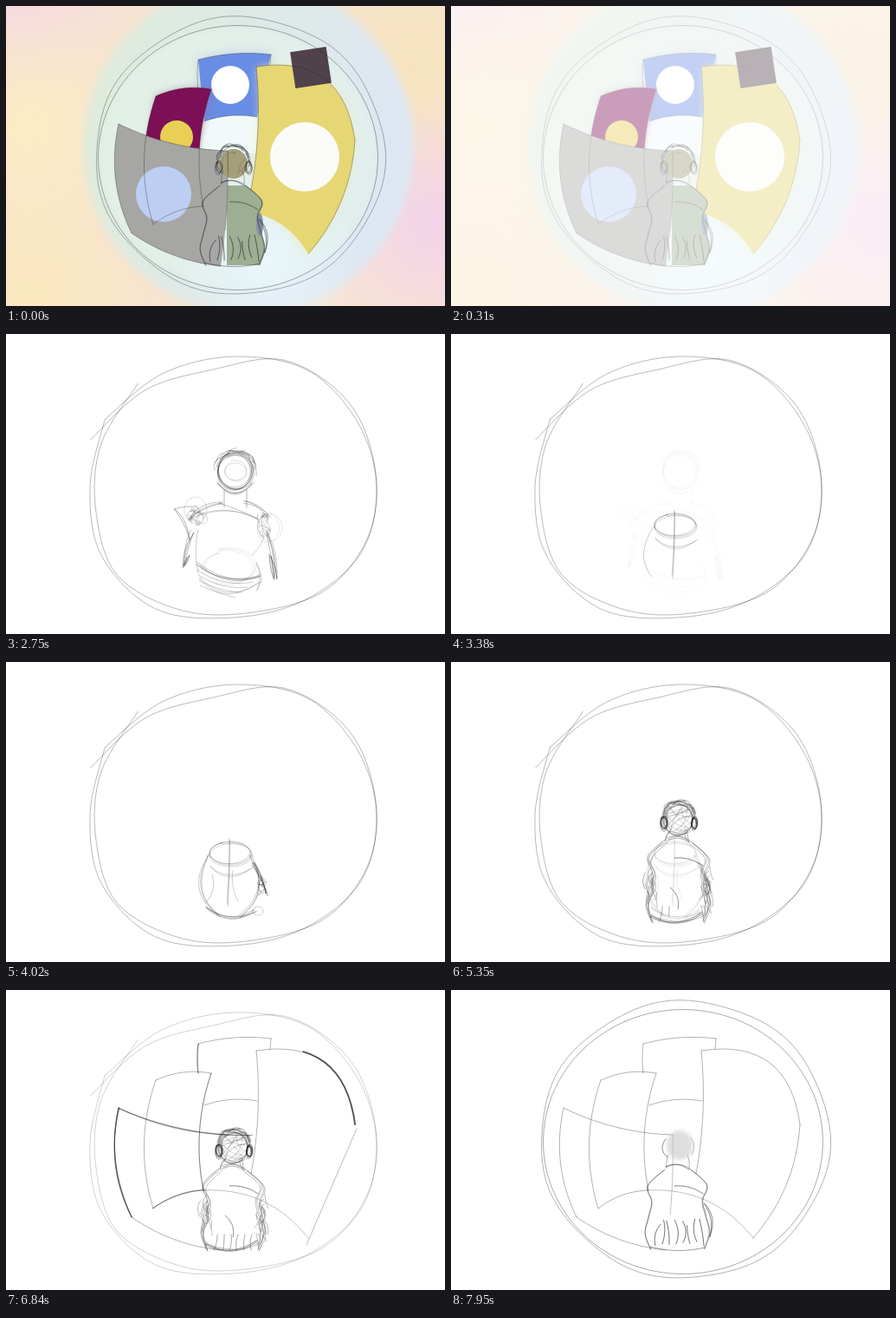
Recreate the animation shown at these times as an HTML page with a canvas. Size 507x346 px, loop 8 s.

```html
<!DOCTYPE html>
<html lang="en">
<head>
<meta charset="utf-8">
<title>Sketch time-lapse</title>
<style>
  html, body { margin: 0; width: 100%; height: 100%; overflow: hidden; background: #fff; }
  canvas { display: block; width: 507px; height: 346px; }
</style>
</head>
<body>
<canvas id="stage" width="507" height="346"></canvas>
<script>
const ctx = document.getElementById('stage').getContext('2d');
const W = 507, H = 346, LOOP = 8000, TAU = 2 * Math.PI;
const clamp = v => Math.max(0, Math.min(1, v));
const mix = (a, b, u) => a + (b - a) * u;
const range = n => Array.from({ length: n }, (_, i) => i);
const sides = [-1, 1];

let seed = 11;
const rnd = () => (seed = (seed * 16807) % 2147483647) / 2147483647;
const spread = r => (rnd() * 2 - 1) * r;

// --- Curves, as lists of points ---

// Catmull-Rom curve through the points.
function smooth(pts) {
  const out = [pts[0]];
  const at = i => pts[Math.max(0, Math.min(pts.length - 1, i))];
  for (let i = 0; i < pts.length - 1; i++) {
    const [a, b, c, d] = [at(i - 1), at(i), at(i + 1), at(i + 2)];
    for (let k = 1; k <= 8; k++) {
      const u = k / 8;
      out.push([0, 1].map(n => 0.5 * (2 * b[n] + (c[n] - a[n]) * u
        + (2 * a[n] - 5 * b[n] + 4 * c[n] - d[n]) * u * u
        + (3 * b[n] - a[n] - 3 * c[n] + d[n]) * u ** 3)));
    }
  }
  return out;
}

// Bowed edge; a positive bulge leans to the left of the direction of travel.
function bow([x0, y0], [x1, y1], bulge = 0) {
  const len = Math.hypot(x1 - x0, y1 - y0) || 1;
  return range(17).map(i => {
    const u = i / 16, push = 4 * u * (1 - u) * bulge / len;
    return [mix(x0, x1, u) + (y1 - y0) * push, mix(y0, y1, u) - (x1 - x0) * push];
  });
}

const oval = (cx, cy, rx, ry, radius = () => 1) => range(97).map(i => {
  const a = i / 96 * TAU - 2, r = radius(a);
  return [cx + rx * r * Math.cos(a), cy + ry * r * Math.sin(a)];
});

// Freehand loop from one radius every 30 degrees.
const loop = (from, radii) => smooth(radii.map((r, i) => {
  const a = (from + 30 * i) * Math.PI / 180;
  return [262.5 + 165.5 * r * Math.cos(a), 176.5 + 150.5 * r * Math.sin(a)];
}));

// One side of a body: half-widths spaced evenly from top to bottom.
const flank = (side, cx, top, bottom, widths) => smooth(widths.map((w, i) =>
  [cx + side * w, mix(top, bottom, i / (widths.length - 1))]));

// --- Pencil strokes ---

// A curve, loosely retraced a number of times.
function pencil(pts, alpha = 0.5, width = 0.7, times = 1, wobble = 2) {
  const runs = range(times).map(() => {
    const w = times > 1 ? wobble : 0;
    const [ax, ay, bx, by, mx, my] = range(6).map(() => spread(w));
    return pts.map(([x, y], i) => {
      const u = i / (pts.length - 1), hump = 4 * u * (1 - u);
      return [x + mix(ax, bx, u) + mx * hump, y + mix(ay, by, u) + my * hump];
    });
  });
  return { runs, alpha, width };
}

// Many short strokes; the rule gives start, end and bulge for each u in 0..1.
const strands = (n, alpha, width, rule) =>
  range(n).map(i => pencil(bow(...rule(i / (n - 1))), alpha, width));

// Random strokes along the flanks of a body.
const scuffs = (n, alpha, reach, top, bottom) => strands(n, alpha, 0.7, () => {
  const x = 262 + (rnd() < 0.5 ? -1 : 1) * (reach + spread(6)), y = mix(top, bottom, rnd());
  return [[x, y], [x + spread(6), y + 8 + rnd() * 12], spread(4)];
});

// Random chords across an ellipse.
const chords = (n, cx, cy, rx, ry, alpha) => strands(n, alpha, 0.6, () => {
  const [a, b] = [rnd() * TAU, rnd() * TAU];
  const rim = t => [cx + rx * Math.cos(t), cy + ry * Math.sin(t)];
  return [rim(a), rim(b), spread(6)];
});

// Locks of hair swept over the crown.
const crown = (n, cx, cy, r, alpha) => strands(n, alpha, 0.7, u => {
  const a = Math.PI * (1.02 + 0.8 * u);
  const rim = (t, k) => [cx + r * k * Math.cos(t), cy + r * k * Math.sin(t)];
  return [rim(a, 1 + spread(0.1)), rim(a + 0.5 + rnd() * 0.5, 1.03 + spread(0.12)), 2 + spread(2)];
});

// --- The drawing, stage by stage ---

const roughRing = [
  pencil(loop(200, [1.06, 0.965, 0.91, 1.035, 1.035, 1, 1.015, 1.02, 0.97, 1.01, 1.055, 0.975, 0.98, 1.035]), 0.45),
  pencil(loop(210, [1.035, 1, 1, 1.035, 1, 1, 1.025, 1, 1, 1.08, 1.06, 1, 1.035]), 0.45)
];

const firstBody = [
  pencil(bow([213, 214], [291, 213], 9), 0.3, 0.7, 2),
  pencil(bow([246, 195], [290, 213], 1), 0.4),
  ...sides.map(s => pencil(oval(260 + 35 * s, 213, 5, 6), 0.3, 0.6, 2)),
  ...sides.map(s => pencil(bow([258 + 43 * s, 228], [258 + 53 * s, 275 + 7 * s], 2 * s), 0.4, 0.7, 4)),
  ...sides.map(s => pencil(bow([258 + 48 * s, 256], [258 + 53 * s, 275 + 7 * s]), 0.55, 0.9, 3)),
  pencil(oval(304, 224, 13, 16), 0.16, 0.6, 2),
  pencil(bow([298, 233], [284, 255], 2), 0.3),
  pencil(oval(258, 268, 30, 19), 0.13, 0.6, 3, 3),
  ...strands(5, 0.33, 0.7, u => [[220 + 4 * u, 266 + 24 * u], [293 - 28 * u, 280 + 24 * u], -9 + 8 * u]),
  pencil(bow([290, 265], [288, 296], 5), 0.3, 0.7, 2)
];

const firstSeat = [
  pencil(bow([222, 226], [222, 276], -3), 0.35),
  pencil(bow([222, 265], [293, 278], -10), 0.4, 0.7, 3),
  pencil(bow([222, 280], [294, 284], -17), 0.3, 0.7, 2)
];

const firstHead = [
  pencil(oval(265, 159, 20, 21), 0.4, 0.7, 6, 3),
  pencil(oval(265, 157, 12, 10), 0.25, 0.6, 2),
  ...crown(18, 265, 158, 23, 0.4),
  pencil(bow([245, 171], [285, 171], -13), 0.4, 0.7, 3),
  ...sides.map(s => pencil(bow([265 + 13 * s, 180], [265 + 13 * s, 200]), 0.5)),
  ...sides.map(s => pencil(bow([262 + 12 * s, 194], [258 + 46 * s, 212], 4 * s), 0.4, 0.7, 3)),
  pencil(bow([215, 199], [195, 202], -1), 0.45),
  pencil(bow([195, 202], [211, 236], 2), 0.5, 0.7, 2),
  pencil(oval(219, 203, 13, 15), 0.2),
  ...chords(14, 219, 211, 8, 9, 0.4),
  ...chords(14, 299, 222, 7, 14, 0.35),
  pencil(bow([218, 216], [237, 248], 2), 0.4, 0.7, 2)
];

const potSides = sides.map(s => pencil(flank(s, 258, 222, 294, [24, 32, 34, 28, 12]), 0.35, 0.7, 3));
const bowl = [
  pencil(oval(259, 222, 24, 13), 0.3, 0.6, 4),
  pencil(bow([237, 236], [284, 237], -10), 0.25, 0.6, 3),
  pencil(bow([259, 203], [255, 280], 2), 0.35, 0.7, 2),
  ...potSides,
  pencil(bow([238, 245], [230, 278], 5), 0.35),
  pencil(bow([262, 240], [268, 276], -3), 0.3),
  pencil(bow([232, 283], [288, 287], -10), 0.4, 0.7, 4),
  pencil(bow([286, 233], [301, 268], 2), 0.5, 0.9, 4),
  ...chords(10, 297, 259, 5, 8, 0.45),
  pencil(oval(291, 287, 6, 5), 0.3)
];

const torso = [15, 34, 29, 33, 37, 31];
const torsoSides = sides.map(s => flank(s, 262, 207, 299, torso));
const headphones = (alpha, width, times) =>
  sides.map(s => pencil(oval(263 + 18 * s, 186, 3.5, 7), alpha, width, times, 1.5));

const roughFigure = [
  pencil(oval(263, 181, 17, 17), 0.4, 0.7, 5),
  ...chords(24, 263, 180, 16, 15, 0.3),
  ...crown(24, 263, 180, 19, 0.5),
  ...headphones(0.6, 0.9, 5),
  pencil(bow([249, 205], [275, 207], 4), 0.5, 0.7, 3),
  ...sides.map(s => pencil(bow([262 + 10 * s, 194], [262 + 13 * s, 207]), 0.5, 0.7, 2)),
  ...torsoSides.map(pts => pencil(pts, 0.4, 0.7, 4, 2.5)),
  pencil(bow([258, 226], [291, 235], 3), 0.6, 0.9),
  ...scuffs(34, 0.45, 32, 234, 282),
  pencil(bow([232, 291], [292, 291], -9), 0.4, 0.7, 5, 3),
  pencil(bow([253, 260], [262, 285], 4), 0.55, 0.9),
  ...strands(6, 0.5, 0.8, u => [[244 + 40 * u, 282], [242 + 44 * u + spread(3), 300], spread(2)])
];

// Corners run clockwise from the top left.
const back = [[222, 62], [306, 56], [290, 128], [229, 133]];
const tall = [[173, 104], [237, 96], [228, 231], [170, 252]];
const near = [[130, 136], [256, 167], [248, 300], [145, 262]];
const wide = [[289, 70], [403, 155], [349, 286], [283, 212]];

// Edges of a quad from one bulge per side.
const quad = (c, bulges) => bulges.map((b, i) => bow(c[i], c[(i + 1) % 4], b));
const backEdges = quad(back, [4, 0, -4, 0]);
const tallEdges = quad(tall, [5, -9, -5, 12]);
const nearEdges = quad(near, [-7, 3, 7, 11]);
const wideEdges = quad(wide, [36, 12, 0, -5]);
const backLeft = bow(back[0], [222, 96], -1);
const floor = bow(tall[2], wide[2], 17);

const frames = [
  backLeft, backEdges[0], bow(back[1], [305, 68]), backEdges[2], ...tallEdges,
  nearEdges[0], nearEdges[2], nearEdges[3], wideEdges[3]
].map(e => pencil(e, 0.5));
const floorLine = pencil(floor, 0.4);
const wideCurve = [wideEdges[0], wideEdges[1]].map(e => pencil(e, 0.5));

const boldFrames = [
  pencil(backLeft, 0.5, 1),
  pencil(tallEdges[1], 0.4, 0.8),
  pencil(tallEdges[2], 0.35, 0.9, 2, 1),
  pencil(bow(near[0], [284, 168], -9), 0.45, 0.8, 2, 1),
  pencil(nearEdges[3], 0.5, 0.9, 3, 1),
  pencil(wideEdges[0], 0.5),
  pencil(wideEdges[0].slice(5), 0.5, 1.1, 3, 1),
  pencil(bow([405, 160], [347, 294]), 0.45)
];

const outerRing = [pencil(oval(270.5, 172.5, 167, 160, a => 1 + 0.008 * Math.sin(7 * a + 1)), 0.5)];
const innerRing = [pencil(oval(268, 175, 161.5, 152.5), 0.55)];

const cleanFigure = [
  pencil(bow([248, 204], [275, 207], 4), 0.55, 0.8, 2, 1),
  ...sides.map(s => pencil(bow([262 + 11 * s, 190], [262 + 13 * s, 206], s), 0.5)),
  ...torsoSides.map(pts => pencil(pts, 0.5, 0.8, 2, 1)),
  pencil(bow([230, 296], [293, 297], -4), 0.55, 0.8),
  pencil(bow([258, 226], [291, 235], 3), 0.6, 0.9),
  pencil(nearEdges[1].slice(0, 12), 0.4),
  ...strands(8, 0.65, 1, u => [[239 + 48 * u + spread(4), 260 + rnd() * 12], [236 + 56 * u, 293 + spread(3)], spread(4)]),
  pencil(bow([293, 247], [298, 284], 5), 0.6, 0.9, 2, 1),
  pencil(bow([248, 172], [250, 193], -5), 0.6, 0.9),
  pencil(bow([277, 170], [278, 190], 3), 0.45)
];
const paintedHair = [...crown(20, 263, 179, 18, 0.6), ...headphones(0.55, 0.9, 3), ...chords(5, 263, 181, 14, 12, 0.3)];

// Each group is drawn from..to, then rubbed out over gone..clear.
const groups = [
  { items: roughRing, from: 630, to: 920, gone: 6600, clear: 7200 },
  { items: firstBody, from: 900, to: 1330, gone: 2990, clear: 3380 },
  { items: firstSeat, from: 1340, to: 2040, gone: 2990, clear: 3380 },
  { items: firstHead, from: 2120, to: 2740, gone: 2990, clear: 3380 },
  { items: bowl, from: 3220, to: 4010, gone: 4720, clear: 5700 },
  { items: roughFigure, from: 4090, to: 5350, gone: 7320, clear: 7640 },
  { items: [...frames, floorLine], from: 5590, to: 6370 },
  { items: boldFrames, from: 5900, to: 6800, gone: 7240, clear: 7640 },
  { items: outerRing, from: 6920, to: 7240 },
  { items: innerRing, from: 7320, to: 7640 },
  { items: wideCurve, from: 7320, to: 7640 },
  { items: cleanFigure, from: 7400, to: 7880 }
];

function drawStroke({ runs, alpha, width }, part = 1, fade = 1) {
  ctx.strokeStyle = `rgba(35,35,38,${alpha * fade})`;
  ctx.lineWidth = width;
  runs.forEach((pts, i) => {
    const n = Math.ceil(clamp(part * runs.length - i) * pts.length);
    if (n < 2) return;
    ctx.beginPath();
    pts.slice(0, n).forEach(p => ctx.lineTo(...p));
    ctx.stroke();
  });
}

function drawSketch(t) {
  for (const { items, from, to, gone = Infinity, clear = Infinity } of groups) {
    if (t <= from || t >= clear) continue;
    const fade = t > gone ? 1 - (t - gone) / (clear - gone) : 1;
    const done = clamp((t - from) / (to - from)) * items.length;
    items.forEach((item, i) => drawStroke(item, clamp(done - i), fade));
  }
  const head = clamp((t - 7400) / 300);
  if (head) spot(264, 179, 15, 17, `rgba(195,195,195,${0.55 * head})`, 2);
}

// --- The finished painting ---

function spot(x, y, rx, ry, color, blur = 0) {
  ctx.filter = blur ? `blur(${blur}px)` : 'none';
  ctx.fillStyle = color;
  ctx.beginPath();
  ctx.ellipse(x, y, rx, ry, 0, 0, TAU);
  ctx.fill();
  ctx.filter = 'none';
}

function fill(color, edges, blur = 0) {
  ctx.filter = blur ? `blur(${blur}px)` : 'none';
  ctx.fillStyle = color;
  ctx.beginPath();
  edges.flat().forEach(p => ctx.lineTo(...p));
  ctx.fill();
  ctx.filter = 'none';
}

function glow(x, y, r, rgb) {
  const g = ctx.createRadialGradient(x, y, 0, x, y, r);
  g.addColorStop(0, `rgba(${rgb},1)`);
  g.addColorStop(1, `rgba(${rgb},0)`);
  ctx.fillStyle = g;
  ctx.fillRect(0, 0, W, H);
}

function drawPainting() {
  ctx.fillStyle = '#f8e4d2';
  ctx.fillRect(0, 0, W, H);
  glow(10, 0, 130, '245,217,226');
  glow(30, 140, 150, '251,236,196');
  glow(30, 330, 160, '251,233,190');
  glow(470, 70, 170, '246,227,190');
  glow(495, 250, 150, '243,211,234');
  const mist = ctx.createLinearGradient(90, 0, 470, 100);
  mist.addColorStop(0, '#dfebda');
  mist.addColorStop(1, '#dde7f3');
  spot(280, 163, 191, 192, mist, 5);
  spot(268, 175, 160, 151, 'rgba(228,243,236,.6)', 3);
  glow(300, 290, 110, '233,246,252');

  fill('rgba(170,180,225,.6)', backEdges, 6);
  fill('#688de4', backEdges);
  fill('#f1f9f9', [backEdges[2], [[226, 170], [289, 170]]]);
  spot(259, 91, 22, 22, '#fff');

  fill('rgba(165,95,140,.5)', tallEdges.slice(0, 1).concat([[[221, 166], [163, 166]]]), 4);
  const nearSide = [[221, 170], [162, 170]];
  fill('#7d0f56', [tallEdges[0], tallEdges[1].slice(0, 9), nearSide, tallEdges[3].slice(8)]);
  spot(197, 151, 19, 19, '#e8cf55');

  fill('#a6a6a4', nearEdges);
  spot(182, 217, 32, 32, '#bccff2');

  fill('rgba(240,233,175,.6)', wideEdges, 5);
  fill('#e6d774', [wideEdges[0], wideEdges[1], bow(wide[2], [284, 238], -9), wideEdges[3]]);
  spot(345, 174, 40, 40, '#fbfbf9');

  ctx.save();
  ctx.translate(352, 71);
  ctx.rotate(-0.15);
  ctx.fillStyle = '#50424a';
  ctx.fillRect(-21, -21, 42, 42);
  ctx.restore();

  ctx.save();
  ctx.beginPath();
  ctx.rect(255, 190, 60, 120);
  ctx.clip();
  fill('#9dae92', [torsoSides[0], [...torsoSides[1]].reverse()]);
  ctx.restore();
  spot(263, 182, 16, 17, '#a39f78');
  spot(293, 252, 4, 13, '#8790a4');

  [frames, wideCurve, outerRing, innerRing, cleanFigure, paintedHair].flat().forEach(s => drawStroke(s));
}

// --- Playback ---

// Bursts of change: start, end, number of steps.
const bursts = [
  [110, 390, 5], [630, 1100, 7], [1260, 2040, 11], [2120, 2910, 11], [2990, 3780, 11],
  [3860, 4650, 11], [4720, 5510, 11], [5590, 6370, 11], [6450, 7240, 11], [7320, 7950, 9]
];

function stepTime(t) {
  const past = bursts.filter(([a]) => t >= a);
  if (!past.length) return 0;
  const [a, b, n] = past[past.length - 1];
  const k = Math.min(n, Math.floor((t - a) / (b - a) * (n - 1) + 1e-6) + 1);
  return a + (b - a) * k / n;
}

const painting = document.createElement('canvas');
painting.width = W;
painting.height = H;
ctx.lineCap = ctx.lineJoin = 'round';
drawPainting();
painting.getContext('2d').drawImage(ctx.canvas, 0, 0);

function render(now) {
  const t = stepTime(now % LOOP);
  ctx.fillStyle = '#fff';
  ctx.fillRect(0, 0, W, H);
  if (t < 390) {
    ctx.globalAlpha = 1 - clamp((t - 110) / 280);
    ctx.drawImage(painting, 0, 0);
    ctx.globalAlpha = 1;
  } else {
    drawSketch(t);
  }
}

const start = performance.now();
function tick() {
  render(performance.now() - start);
  requestAnimationFrame(tick);
}
tick();
</script>
</body>
</html>
```
